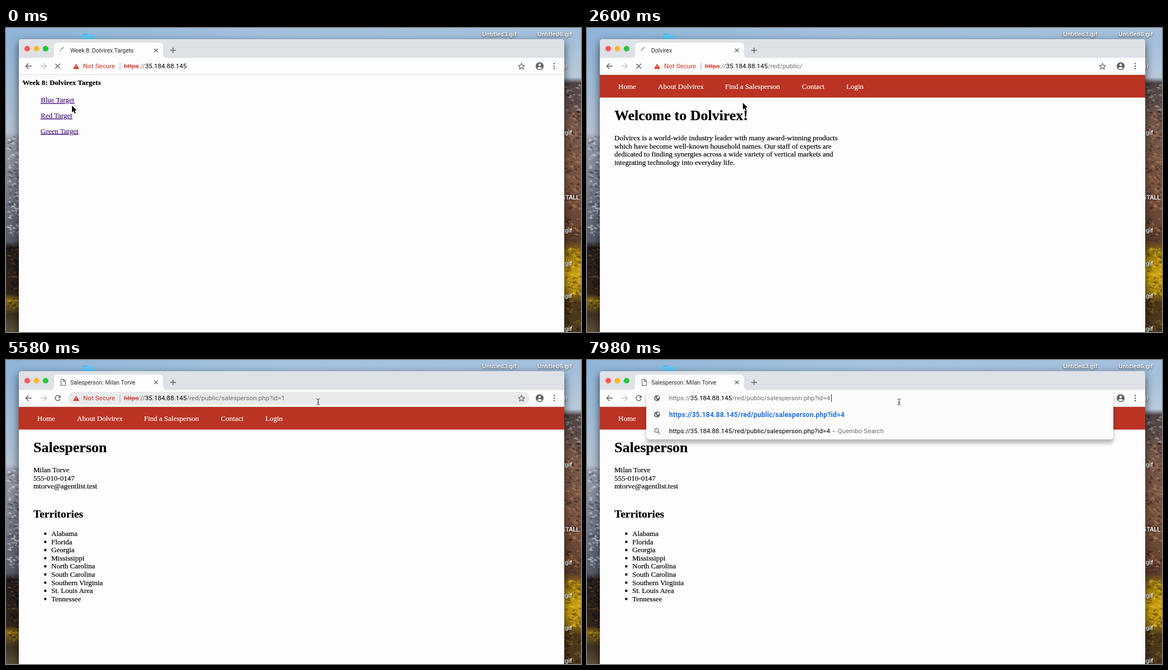
An HTML page that plays this animation: 1029x544 px, repeating every 8000 ms.

```html
<!DOCTYPE html>
<html lang="en">
<head>
<meta charset="utf-8">
<style>
  html, body { margin: 0; width: 100%; height: 100%; overflow: hidden; }
  svg { display: block; }
  text { font: 13px "Liberation Serif", serif; white-space: pre; color: #000; stroke-width: .2; }
  text, tspan { fill: currentColor; stroke: currentColor; }
  .bold { font-weight: 700; }
  .h1 { font-size: 26px; font-weight: 700; }
  .h2 { font-size: 19.5px; font-weight: 700; }
  .nav { color: #fff; }
  .link { color: #00e; text-decoration: underline; }
  .visited { color: #4b1580; text-decoration: underline; }
  .ui { font: 11.65px Roboto, sans-serif; stroke-width: 0; }
  .tab { font: 10.45px Roboto, sans-serif; color: #3c4043; stroke-width: .1; }
  .match { font-size: 12px; font-weight: 700; letter-spacing: .25px; color: #1a6fe8; }
  .label { font: 700 10.1px Inter, sans-serif; color: #fff; stroke-width: 0; filter: drop-shadow(0 1px 1px #000b); }
  .clipped { text-anchor: end; }
  .grey { color: #6b6f73; }
  .warn { color: #cf3428; }
  .strike { color: #cf3428; text-decoration: line-through; }
  .line { fill: none; stroke: #5f6368; stroke-width: 1.4; }
</style>
</head>
<body>
<svg id="stage" width="1029" height="544" viewBox="0 0 1029 544"></svg>
<script>
const company = 'Dolvirex', agent = 'Milan Torve', host = '35.184.88.145';
const profile = '/red/public/salesperson.php?id=';

const text = (x, y, s, cls = '', id = '') => `<text id="${id}" x="${x}" y="${y}" class="${cls}">${s}</text>`;
const span = (s, cls) => `<tspan class="${cls}">${s}</tspan>`;
const rect = (x, y, w, h, fill, r = 0) =>
  `<rect x="${x}" y="${y}" width="${w}" height="${h}" rx="${r}" fill="${fill}"/>`;
const dot = (x, y, r, fill) => `<circle cx="${x}" cy="${y}" r="${r}" fill="${fill}"/>`;
const line = (d, attrs = '') => `<path class="line" d="${d}" ${attrs}/>`;
const group = (id, s) => `<g id="${id}">${s}</g>`;
const lines = (x, y, list) => list.map((s, i) => text(x, y + i * 14.6, s)).join('');
const gradient = (id, stops) => `<linearGradient id="${id}" x2="0" y2="1">` +
  stops.map(([at, c]) => `<stop offset="${at}" stop-color="${c}"/>`).join('') + '</linearGradient>';

let seed = 7;
const random = () => (seed = seed * 16807 % 2147483647) / 2147483647;
function rocks(x, y, w, h, colors, count) {
  let s = '';
  for (let i = 0; i < count; i++) {
    const size = 2 + random() * 4;
    s += `<path d="M${x + random() * w} ${y + random() * h}l${size} ${-size / 2} ${size / 2} ${size}z"
      fill="${colors[i % colors.length]}" opacity=".6"/>`;
  }
  return s;
}

function desktop() {
  const label = (x, y, s, cls = '') => text(x, y, s, 'label ' + cls);
  return '<defs>' +
    gradient('left', [[0, '#8fb4d8'], [.32, '#b4c3d4'], [.34, '#989eab'], [.52, '#747a88'],
      [.69, '#565b68'], [.71, '#221d1f'], [.87, '#33241a'], [.89, '#8a6a18'], [.94, '#3b3222'], [1, '#5c5138']]) +
    gradient('right', [[0, '#a3bfdc'], [.13, '#b9cadb'], [.15, '#4c4245'], [.28, '#75594c'], [.5, '#7d5640'],
      [.69, '#5d3d2a'], [.74, '#9c7a10'], [.8, '#c9a013'], [.86, '#a17d14'], [.9, '#4a3518'], [1, '#4c3a20']]) +
    '<linearGradient id="sky"><stop stop-color="#8fb4d8"/><stop offset=".5" stop-color="#a5c3df"/>' +
    '<stop offset="1" stop-color="#a3bfdc"/></linearGradient></defs>' +
    rect(0, 0, 1029, 544, 'url(#sky)') + rect(0, 20, 24, 524, 'url(#left)') + rect(998, 20, 31, 524, 'url(#right)') +
    rocks(0, 192, 22, 180, ['#e3e7ee', '#454b59', '#b3b9c5'], 150) +
    rocks(0, 385, 22, 95, ['#0f0d0d', '#6b4a2c'], 60) + rocks(0, 485, 22, 20, ['#b8911c', '#2c2416'], 20) +
    rocks(999, 100, 28, 50, ['#2b2528', '#a9a3a5', '#6f5a52'], 60) +
    rocks(999, 150, 28, 235, ['#33241f', '#b97f5a', '#5a4640'], 240) +
    rocks(999, 395, 28, 85, ['#e8c31c', '#5c470c', '#c79a12'], 110) +
    rocks(999, 485, 28, 55, ['#271d10', '#8f6d22'], 40) +
    rect(136, 10, 10, 5, '#49b7ef', 1.5) + rect(136, 12, 22, 10, '#63c8f8', 1) +
    label(852, 15, 'Untitled3.gif') + label(951, 15, 'Untitled6.gif') + label(1026, 307, 'INSTALL', 'clipped') +
    [73, 190.5, 366, 424.5, 483, 541.5].map((y, i) => label(i ? 1013 : 1005, y, '.gif', 'clipped')).join('');
}

const cross = (x, y, r) => `M${x - r} ${y - r}l${2 * r} ${2 * r}m0 ${-2 * r}l${-2 * r} ${2 * r}`;

function browser() {
  return `<rect x="23" y="20" width="976" height="560" rx="5" fill="#fdfdfd"
      style="filter:drop-shadow(0 6px 8px #000a)"/>` +
    '<path d="M23 54V25q0-5 5-5H994q5 0 5 5V54z" fill="#dee1e6"/>' +
    '<path d="M79 54q7 0 7-7V33q0-7 7-7H274q7 0 7 7V47q0 7 7 7z" fill="#fdfdfd"/>' +
    rect(23, 53.5, 976, 30, '#fdfdfd') + rect(23, 83, 976, 1, '#dcdcdc') +
    dot(38, 37, 5.1, '#fc5b57') + dot(54.4, 37, 5.1, '#fdb92e') + dot(70.8, 37, 5.1, '#29c440') +
    line(cross(268.3, 40, 3.1)) + line('M294 40h10M299 35v10') +
    line('M46 68.3H35.5M40.3 63.3l-5 5 5 5') +
    line('M61.5 68.3H72M67.2 63.3l5 5-5 5', 'style="stroke:#bfc2c5"') +
    group('spinner', line('M97.6 42A6 6 0 0 1 104 35.2', 'style="stroke:#8d9298"') + line(cross(92.5, 68.3, 4.3))) +
    group('idle', line('M98.5 34.5h4.5l3.5 3.5v7.5h-8zM102.8 34.5v3.7h3.7', 'stroke-linejoin="round" style="stroke-width:1.1"') +
      line('M96.4 65.6A4.6 4.6 0 1 0 97 69.4') + '<path d="M97.7 63v4.8h-4.8z" fill="#5f6368"/>') +
    text(115, 43.5, '', 'tab', 'title');
}

function addressBar() {
  return '<rect id="pill" x="111" y="57" width="826" height="23" rx="11.5"/>' +
    '<rect id="selection" y="61" height="15" fill="#b3d7fd"/>' +
    '<path d="M125.5 63.7l5.4 9.5h-10.8z" fill="#d93025"/>' + rect(125, 66.8, 1, 3, '#fff') + rect(125, 70.8, 1, 1, '#fff') +
    text(138, 72.4, 'Not Secure', 'ui warn') + rect(203.5, 62, 1, 13, '#aaa') +
    text(211, 72.4, '', 'ui', 'url') +
    line('M922.5 63.2l1.6 3.5 3.8.4-2.8 2.6.8 3.8-3.4-2-3.4 2 .8-3.8-2.8-2.6 3.8-.4z', 'style="stroke-width:1.2"') +
    dot(955, 68.3, 7, '#5f6368') + dot(955, 66, 2.2, '#fff') +
    '<path d="M950.6 71.7q4.4-4 8.8 0q-4.4 4-8.8 0z" fill="#fff"/>' +
    [63.8, 68.3, 72.8].map(y => dot(981, y, 1.3, '#5f6368')).join('');
}

const navBar = rect(23, 84, 976, 40.5, '#bb3323') +
  [[56, 'Home'], [127, 'About ' + company], [247, 'Find a Salesperson'], [384.5, 'Contact'], [464, 'Login']]
    .map(([x, s]) => text(x, 109, s, 'nav')).join('');

function territories() {
  const link = (y, s) => text(81, y, s, 'link');
  const bullet = y => rect(68, y - 6, 4.2, 4.2, '#000');
  const row = (y, place, name) => text(49, y, place) + bullet(y + 14.6) + link(y + 14.6, name);
  const walter = 'Walter Pendrith', nadia = 'Nadia Corvel';
  return text(49, 165, 'Find a Salesperson', 'h1') +
    text(49, 201, 'Use the list below to find a salesperson nearby. We are ready to serve you!') +
    text(49, 228.5, 'UNITED STATES', 'bold') +
    [['Alabama (AL)', agent], ['Alaska (AK)', walter], ['Arizona (AZ)', nadia], ['Arkansas (AR)', 'Charlotte Ebsen']]
      .map(([place, name], i) => row(256 + i * 42.3, place, name)).join('') +
    text(49, 425.3, 'California (CA)') +
    bullet(440) + text(81, 440, 'Northern California') + link(454.6, walter) +
    bullet(469) + text(81, 469, 'Southern California') + link(484, 'Marcia Delvoro') +
    row(511.5, 'Colorado (CO)', nadia);
}

const places = ['Alabama', 'Florida', 'Georgia', 'Mississippi', 'North Carolina',
  'South Carolina', 'Southern Virginia', 'St. Louis Area', 'Tennessee'];

const pages = [
  { title: `Week 8: ${company} Targets`, path: '',
    body: text(29.5, 101.5, `Week 8: ${company} Targets`, 'bold') +
      ['Blue', 'Red', 'Green'].map((c, i) => text(62, 133.3 + i * 27.7, c + ' Target', 'visited')).join('') },
  { title: company, path: '/red/public/',
    body: navBar + text(49, 165, `Welcome to ${company}!`, 'h1') + lines(49, 201, [
      company + ' is a world-wide industry leader with many award-winning products',
      'which have become well-known household names. Our staff of experts are',
      'dedicated to finding synergies across a wide variety of vertical markets and',
      'integrating technology into everyday life.']) },
  { title: 'Find a Salesperson', path: '/red/public/territories.php', body: navBar + territories() },
  { title: 'Salesperson: ' + agent, path: profile + 1,
    body: navBar + text(49, 165, 'Salesperson', 'h1') +
      lines(49, 201, [agent, '555-010-0147', 'mtorve@agentlist.test']) +
      text(49, 282, 'Territories', 'h2') + lines(81, 315, places) +
      places.map((p, i) => dot(70.3, 310.8 + i * 14.6, 2.2, '#000')).join('') },
];

function dropdown() {
  const globe = y => dot(125.3, y, 5.3, '#5f6368') +
    `<path d="M121 ${y - 2}l3 2 1 4-2-1zM126 ${y - 4}l3 2-1 3-3-2z" fill="#fff"/>`;
  const typed = 'https://' + host + profile + 4;
  return `<path d="M106 54H942V136q0 6-6 6H112q-6 0-6-6z" fill="#fcfcfc"
      style="filter:drop-shadow(0 7px 3px #0004)"/>` +
    globe(68.3) + globe(97.5) +
    line('M127.4 129.3l3 3', 'style="stroke-width:1.3"') + '<circle class="line" cx="124.5" cy="126" r="3.4" style="stroke-width:1.2"/>' +
    text(147, 72.4, span('https://', 'grey') + host + span(profile + 4, 'grey'), 'ui') +
    rect(437, 61, 1, 14, '#333') + text(147, 101.7, typed, 'ui match') +
    text(147, 131, typed + span(' – Quembo Search', 'grey'), 'ui');
}

const $ = id => document.getElementById(id);
$('stage').innerHTML = desktop() + browser() + addressBar() +
  pages.map((p, i) => group('page' + i, p.body)).join('') + group('dropdown', dropdown()) +
  group('cursor',
    group('arrow', '<path d="M0 0V12l2.8-2.6 1.9 4.4 2-.9-1.9-4.3h3.8z" stroke="#fff" stroke-width="1.2" paint-order="stroke"/>') +
    group('hand', '<path d="M-1 1q1.3-1.6 2.6 0V6l5.5 1.2q1.6.4 1.4 2l-1 5.3H0l-3.9-5q0-1.6 1.6-1L-1 9.7z" fill="#fff" stroke="#000" stroke-width=".9"/>') +
    group('beam', '<path d="M-3-5.5q3 0 3 2q0-2 3-2M0-4V4M-3 5.5q3 0 3-2q0 2 3 2M-1.5 1h3" fill="none" stroke="#222" stroke-width=".9"/>'));

// time, x, y, pointer shape
const pointer = [
  [0, 118, 139, 'arrow'], [140, 165, 118, 'arrow'], [290, 270, 80, 'arrow'], [530, 419, 45, 'arrow'],
  [680, 430, 26, 'arrow'], [830, 432, 50, 'arrow'], [980, 428, 82, 'arrow'], [1110, 424, 106, 'arrow'],
  [1260, 418, 113, 'hand'], [1410, 392, 114, 'hand'], [1560, 362, 115, 'arrow'], [1700, 335, 113, 'hand'],
  [1850, 322, 112, 'hand'], [2450, 312, 117, 'hand'], [2600, 279, 134, 'arrow'], [2750, 235, 172, 'arrow'],
  [2900, 190, 216, 'arrow'], [3050, 155, 250, 'arrow'], [3200, 138, 265, 'hand'], [3340, 130, 269, 'hand'],
  [3490, 129, 270, 'hand'], [4240, 170, 256, 'arrow'], [4390, 310, 215, 'arrow'], [4530, 448.5, 166, 'arrow'],
  [4680, 510, 132, 'arrow'], [4830, 548, 108, 'arrow'], [4980, 568, 92, 'arrow'], [5130, 575, 80, 'beam'],
  [5280, 576, 74, 'beam'], [5430, 566, 74, 'beam'], [5580, 558.5, 75, 'beam'],
];
// time, page, loading, address bar state
const states = [
  [0, 0, true, 'plain'], [290, 1, true, 'plain'], [530, 1, false, 'plain'],
  [2450, 1, true, 'plain'], [2750, 2, true, 'plain'], [2900, 2, false, 'plain'],
  [4390, 2, true, 'plain'], [4680, 3, true, 'plain'], [4830, 3, false, 'plain'],
  [5130, 3, false, 'hover'], [5880, 3, false, 'all'], [6180, 3, false, 'last'], [7830, 3, false, 'typed'],
];
const at = (list, t) => list.findLast(step => step[0] <= t);
const show = (id, on) => $(id).style.display = on ? '' : 'none';

function draw() {
  const t = performance.now() % 8000;
  const [, x, y, shape] = at(pointer, t);
  const [, page, loading, bar] = at(states, t);
  $('cursor').setAttribute('transform', `translate(${x} ${y})`);
  for (const id of ['arrow', 'hand', 'beam']) show(id, id === shape);
  pages.forEach((p, i) => show('page' + i, i === page));
  show('spinner', loading);
  show('idle', !loading);
  show('dropdown', bar === 'typed');

  const focused = bar === 'all' || bar === 'last';
  $('pill').setAttribute('fill', bar === 'hover' ? '#e8eaec' : '#fdfdfd');
  $('pill').setAttribute('stroke', focused ? '#85b4f2' : 'none');
  $('pill').setAttribute('stroke-width', 1.8);
  show('selection', focused);
  $('selection').setAttribute('x', bar === 'all' ? 211 : 493.5);
  $('selection').setAttribute('width', bar === 'all' ? 288.5 : 6);

  const { title, path } = pages[page];
  if ($('title').textContent !== title) {
    $('title').textContent = title;
    $('url').innerHTML = span('https', 'strike') + span('://', 'grey') + host + span(path, 'grey');
  }
  requestAnimationFrame(draw);
}
draw();
</script>
</body>
</html>
```
